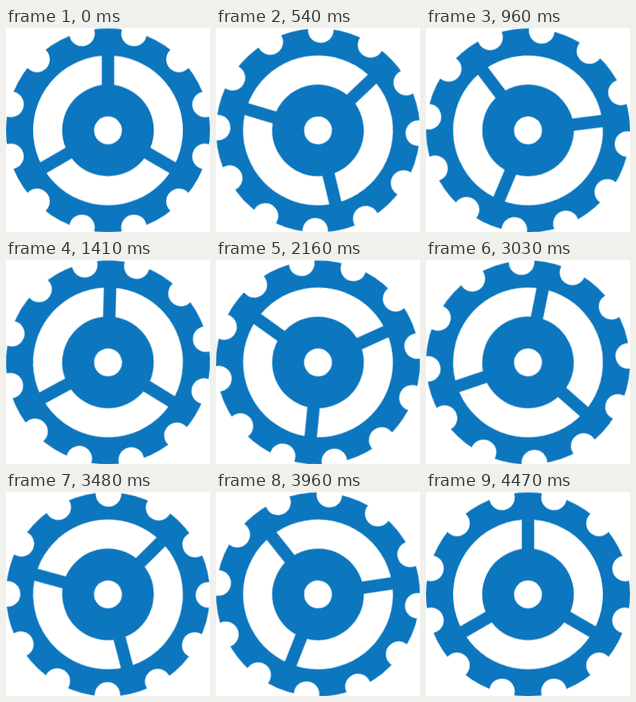
Recreate the animation shown at these times as an HTML page. Size 256 px wide and 256 px high, loop 4500 ms.

```html
<!DOCTYPE html>
<html lang="en">
<head>
<meta charset="utf-8">
<title>Turning gear</title>
<style>
  html, body { margin: 0; width: 100%; height: 100%; overflow: hidden; background: #fff; }
  svg { display: block; width: 100vw; height: 100vh; }
  .blue { fill: #0c76be; }
  .white { fill: #fff; }
  .notches {
    fill: none;
    stroke: #fff;
    stroke-width: 32;
    stroke-linecap: round;
    stroke-dasharray: .001 .999;
  }
  .gear { animation: turn 4.5s infinite; }

  /* 30 ms ticks; the first half turn is slightly quicker */
  @keyframes turn {
    0% { transform: rotate(0deg); animation-timing-function: steps(70); }
    46.6667% { transform: rotate(181.1deg); animation-timing-function: steps(79); }
    99.3333%, 100% { transform: rotate(360deg); }
  }
</style>
</head>
<body>
<svg viewBox="0 0 256 256">
  <g transform="translate(128 128.5)">
    <g class="gear">
      <circle class="blue" r="128"/>
      <circle class="notches" r="126" pathLength="12" transform="rotate(15)"/>
      <circle class="white" r="94"/>
      <g class="blue">
        <rect id="spoke" x="-7.75" y="-96" width="15.5" height="60"/>
        <use href="#spoke" transform="rotate(120)"/>
        <use href="#spoke" transform="rotate(240)"/>
        <circle r="57.5"/>
      </g>
      <circle class="white" r="17.5"/>
    </g>
  </g>
</svg>
</body>
</html>
```
